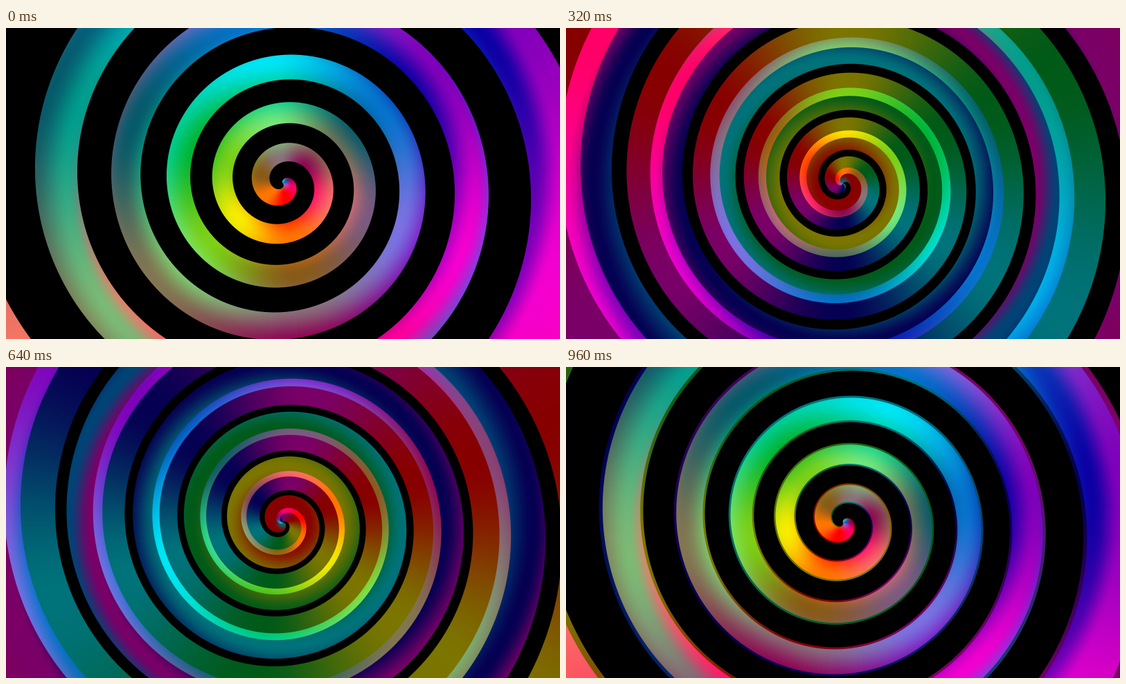
Write an HTML page with a canvas that moves like this. It is 800 by 450 pixels and loops after 1000 ms.

```html
<!DOCTYPE html>
<html lang="en">
<head>
<meta charset="utf-8">
<title>Twin spirals</title>
<style>
html, body { margin: 0; width: 100%; height: 100%; overflow: hidden; background: #000; }
canvas { display: block; width: 800px; height: 450px; }
</style>
</head>
<body>
<canvas id="stage" width="800" height="450"></canvas>
<script>
const W = 800, H = 450, LOOP = 1000, STEP = 40;
const ctx = document.getElementById('stage').getContext('2d');
const image = ctx.createImageData(W, H);
const out = new Uint32Array(image.data.buffer);

const RED = [136, 0, 0], YELLOW = [124, 118, 0], GREEN = [0, 90, 24];
const CYAN = [0, 115, 122], NAVY = [6, 0, 82], PURPLE = [122, 0, 104];

// Smooth colour ramp through [position, colour] stops.
function ramp(stops, size) {
  const lut = new Float32Array(size * 3);
  let s = 0;
  for (let i = 0; i < size; i++) {
    while (s < stops.length - 2 && i > stops[s + 1][0]) s++;
    const [p0, c0] = stops[s], [p1, c1] = stops[s + 1];
    const f = Math.min(1, Math.max(0, (i - p0) / (p1 - p0)));
    const e = f * f * (3 - 2 * f);
    for (let c = 0; c < 3; c++) lut[i * 3 + c] = c0[c] + (c1[c] - c0[c]) * e;
  }
  return lut;
}

const TURN = 1440;
const wheel = ramp([RED, YELLOW, GREEN, CYAN, NAVY, PURPLE, RED]
  .map((c, i) => [i * TURN / 6, c]), TURN);
const rings = ramp([
  [0, CYAN], [14, RED], [34, RED], [82, YELLOW], [134, GREEN], [178, CYAN], [232, NAVY],
  [278, PURPLE], [311, [0, 68, 118]], [362, NAVY], [402, PURPLE], [460, [126, 0, 96]]
], 480);

// Per pixel: swirl coordinate in half turns, edge sharpness, angle and radius indices.
const swirl = new Float32Array(W * H), sharp = new Float32Array(W * H);
const angle = new Uint16Array(W * H), radius = new Uint16Array(W * H);
const A = 0.0401, B = 3.62e-5;
for (let y = 0, i = 0; y < H; y++) {
  for (let x = 0; x < W; x++, i++) {
    const dx = x + 0.5 - W / 2, dy = y + 0.5 - H / 2;
    const r = Math.hypot(dx, dy), a = Math.atan2(dy, dx) / Math.PI;
    swirl[i] = A * r - B * r * r - a + 4;
    sharp[i] = 1 / Math.hypot(A - 2 * B * r, 1 / (Math.PI * r));
    angle[i] = Math.floor((a + 2) * TURN / 2) % TURN;
    radius[i] = Math.round(r);
  }
}

// Share of the pixel covered by the arm.
function cover(u, k) {
  const v = 0.5 + (0.5 - Math.abs((u + 0.5) % 2 - 1)) * k;
  return v < 0 ? 0 : v > 1 ? 1 : v;
}

function draw(t) {
  const start = 1.708, redAngle = 82;
  const fast = 4 - (start + 4 * t) % 2, slow = 4 - (start + 2 * t) % 2;
  const spin = Math.round(((2 * t - redAngle / 360) % 1 + 1) * TURN);
  for (let i = 0; i < out.length; i++) {
    const f = cover(swirl[i] + fast, sharp[i]);
    const s = cover(swirl[i] + slow, sharp[i]);
    const w = (angle[i] + spin) % TURN * 3, g = radius[i] * 3;
    const red = wheel[w] * f + rings[g] * s;
    const green = wheel[w + 1] * f + rings[g + 1] * s;
    const blue = wheel[w + 2] * f + rings[g + 2] * s;
    out[i] = 0xff000000 | Math.min(255, blue) << 16 | Math.min(255, green) << 8 | Math.min(255, red);
  }
  ctx.putImageData(image, 0, 0);
}

const begin = performance.now();
let shown = -1;
function tick() {
  const step = Math.floor((performance.now() - begin) % LOOP / STEP);
  if (step !== shown) {
    shown = step;
    draw(step * STEP / LOOP);
  }
  requestAnimationFrame(tick);
}
tick();
</script>
</body>
</html>
```
